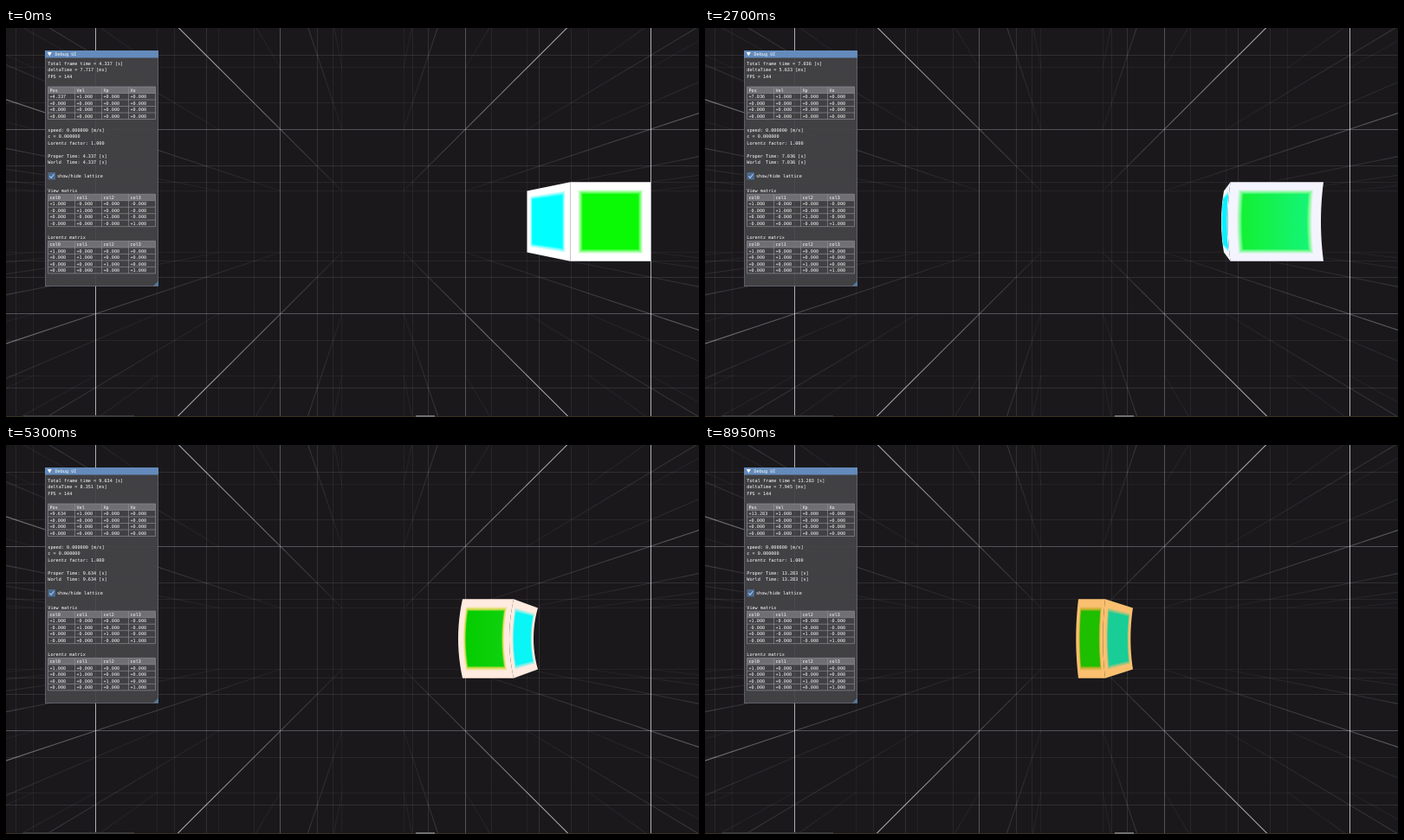
Recreate the animation shown at these times as an HTML page with a canvas. Size 800 by 450 pixels, loop 9000 ms.

```html
<!DOCTYPE html>
<html lang="en">
<head>
<meta charset="utf-8">
<title>Relativistic cube</title>
<style>
  html, body { margin: 0; width: 100%; height: 100%; overflow: hidden; background: #1a181b; }
  canvas, svg { position: absolute; left: 0; top: 0; width: 800px; height: 450px; }
  text {
    font: 5.17px "DejaVu Sans Mono", monospace;
    fill: #fff; white-space: pre; text-rendering: geometricPrecision;
  }
</style>
</head>
<body>
<canvas id="lattice" width="800" height="450"></canvas>
<canvas id="cube" width="800" height="450"></canvas>
<svg id="ui" viewBox="0 0 800 450"></svg>
<script>
const LOOP = 9000, STEP = 50;
const CX = 423.5, CY = 224, FOCAL = 320.5;
const NEAR = 3.5, FAR = 4.5;
const lerp = (a, b, k) => a + (b - a) * k;

// Smooth curve through [time, value] pairs.
function track(points) {
  const slope = (a, b) => (points[b][1] - points[a][1]) / (points[b][0] - points[a][0]);
  const last = points.length - 1;
  const tangent = i => slope(Math.max(i - 1, 0), Math.min(i + 1, last));
  return t => {
    if (t >= points[last][0]) return points[last][1];
    let i = 0;
    while (points[i + 1][0] <= t) i++;
    const [t0, a] = points[i], [t1, b] = points[i + 1];
    const h = t1 - t0, k = (t - t0) / h, k2 = k * k, k3 = k2 * k;
    return a * (2 * k3 - 3 * k2 + 1) + b * (3 * k2 - 2 * k3)
      + h * (tangent(i) * (k3 - 2 * k2 + k) + tangent(i + 1) * (k3 - k2));
  };
}

const COLOR_TIMES = [0, 1300, 2700, 3700, 5300, 7600, 8950];
function colorTrack(list) {
  const colors = list.split(' ').map(hex => [0, 2, 4].map(i => parseInt(hex.substr(i, 2), 16)));
  return t => {
    let i = 0;
    while (i < colors.length - 2 && COLOR_TIMES[i + 1] <= t) i++;
    const k = (t - COLOR_TIMES[i]) / (COLOR_TIMES[i + 1] - COLOR_TIMES[i]);
    return colors[i].map((c, n) => lerp(c, colors[i + 1][n], k));
  };
}
const rgb = c => `rgb(${c.map(Math.round).join()})`;
const mix = (a, b, k) => a.map((c, i) => lerp(c, b[i], k));

// Screen x of the cube's corner edges.
const frontLeft = track([[0, 651.5], [600, 650], [1300, 643], [2700, 606.5], [3700, 574],
  [5300, 527], [7600, 466.5], [8950, 431]]);
const frontRight = track([[0, 744], [950, 743.7], [1300, 742], [1900, 736], [2700, 714],
  [3700, 668], [5300, 586], [7600, 502.5], [8950, 462]]);
const backLeft = track([[0, 601.5], [1300, 602.5], [2700, 599], [3700, 578], [8950, 450]]);
const backRight = track([[0, 672], [2700, 672], [3700, 666], [4750, 634], [5700, 599],
  [6650, 565], [7600, 534], [8950, 494]]);
const bulge = track([[0, 0], [1300, 0.8], [2700, 3], [3700, 4], [5300, 5], [7600, 4.5], [8950, 2.7]]);
const deltaTime = track([[0, 7.717], [1300, 7.915], [2700, 5.633], [3700, 8.017],
  [5300, 8.351], [7600, 8.11], [8950, 7.945]]);

const paint = {
  border: colorTrack('ffffff fcfcff f4f4ff f4f4ff ffebe0 ffd0a8 fac070'),
  halo: colorTrack('84ff80 88fca0 88fa9c 88f890 dcdc50 e8be2c c8b030'),
  left: colorTrack('0afa05 10f546 14f032 00fa00 05cd00 10cd00 1ebe00'),
  right: colorTrack('0afa05 10f546 14f57d 1ee178 10d210 10cd00 1ebe00'),
  side: colorTrack('00ffff 14f0ff 0af0ff 0af0ff 0af5f5 1ec8b0 19cd96'),
};

function drawLattice() {
  const g = document.getElementById('lattice').getContext('2d');
  const stroke = (x0, y0, x1, y1, depth) => {
    g.strokeStyle = `rgba(222,222,225,${Math.min(0.6, 0.47 / depth ** 1.5)})`;
    g.beginPath();
    g.moveTo(x0, y0);
    g.lineTo(x1, y1);
    g.stroke();
  };
  const snap = v => Math.floor(v) + 0.5;
  for (let d = 0.5; d <= FAR; d++) {
    for (let i = -6.5; i <= 6.5; i++) {
      const x = snap(CX + FOCAL * i / d), y = snap(CY + FOCAL * i / d);
      stroke(x, 0, x, 450, d);
      stroke(0, y, 800, y, d);
    }
  }
  // Lines running into the depth, in short pieces that fade.
  g.lineWidth = 1.15;
  const pieces = 24, from = 1 / FAR, to = 2;
  for (let i = -6.5; i <= 6.5; i++) {
    for (let j = -6.5; j <= 6.5; j++) {
      for (let n = 0; n < pieces; n++) {
        const a = lerp(from, to, (n / pieces) ** 1.5);
        const b = lerp(from, to, ((n + 1) / pieces) ** 1.5);
        stroke(CX + FOCAL * i * a, CY + FOCAL * j * a,
               CX + FOCAL * i * b, CY + FOCAL * j * b, 2 / (a + b));
      }
    }
  }
  const strip = (x, y, w, h, color) => { g.fillStyle = color; g.fillRect(x, y, w, h); };
  strip(0, 449, 800, 1, '#393322');
  strip(20, 448, 128, 2, '#3b3b3b');
  strip(473, 448, 22, 2, '#707070');
}

const ctx = document.getElementById('cube').getContext('2d');

function drawFace(x0, d0, x1, d1, bend, border, halo, from, to) {
  const point = (u, v) => {
    const d = lerp(d0, d1, u);
    const x = CX + lerp((x0 - CX) * d0, (x1 - CX) * d1, u) / d;
    return [x - bend * (1 - (2 * v - 1) ** 2), CY + (v - 0.5) * FOCAL / d];
  };
  const fill = (inset, style) => {
    const n = 12;
    ctx.beginPath();
    for (let i = 0; i <= n; i++) ctx.lineTo(...point(inset, lerp(inset, 1 - inset, i / n)));
    for (let i = n; i >= 0; i--) ctx.lineTo(...point(1 - inset, lerp(inset, 1 - inset, i / n)));
    ctx.fillStyle = style;
    ctx.fill();
  };
  fill(0, rgb(border));
  const middle = mix(from, to, 0.5), layers = 6;
  for (let i = 1; i <= layers; i++) {
    const k = 2 * i / (layers + 1);
    const color = k < 1 ? mix(border, halo, k) : mix(halo, middle, k - 1);
    fill(0.09 + 0.055 * i / layers, rgb(color));
  }
  const shade = ctx.createLinearGradient(x0, 0, x1, 0);
  shade.addColorStop(0.1, rgb(from));
  shade.addColorStop(0.9, rgb(to));
  fill(0.15, shade);
}

function drawCube(t) {
  ctx.clearRect(0, 0, 800, 450);
  const l = frontLeft(t), r = frontRight(t), bl = backLeft(t), br = backRight(t), bend = bulge(t);
  const border = paint.border(t), side = paint.side(t), sideHalo = mix(border, side, 0.5);
  if (bl < l) drawFace(bl, FAR, l, NEAR, bend, border, sideHalo, side, side);
  if (br > r) drawFace(r, NEAR, br, FAR, bend, border, sideHalo, side, side);
  drawFace(l, NEAR, r, NEAR, bend, border, paint.halo(t), paint.left(t), paint.right(t));
}

const label = (x, y, str, id = '') => `<text x="${x}" y="${y + 1.9}" id="${id}">${str}</text>`;
const box = (x, y, w, h, attrs) => `<rect x="${x}" y="${y}" width="${w}" height="${h}" ${attrs}/>`;

function table(y, heads, rows) {
  const pitch = 7.5, w = 124;
  let out = box(48.5, y, w, pitch, 'fill="#707074"');
  let grid = '';
  for (let i = 0; i <= 5; i++) grid += `M48.5 ${y + i * pitch}h${w}`;
  for (let i = 0; i <= 4; i++) grid += `M${48.5 + i * 31} ${y}v${5 * pitch}`;
  out += `<path d="${grid}" stroke="#8b8b92" stroke-width=".7" fill="none"/>`;
  [heads, ...rows].forEach((row, r) => row.split(' ').forEach((cell, c) => {
    out += label(50.5 + c * 31, y + 3.8 + r * pitch, cell, cell === '+pos' ? 'pos' : '');
  }));
  return out;
}

function buildPanel() {
  const zeros = '+0.000 +0.000 +0.000 +0.000', cols = 'col0 col1 col2 col3';
  document.getElementById('ui').innerHTML =
    box(45.5, 26.5, 130, 272, 'fill="#444346" fill-opacity=".93" stroke="#6c6c78" stroke-width=".8"') +
    box(45, 26, 131, 8.5, 'fill="#648bbb"') +
    '<path d="M47.8 28h5l-2.5 4.4z" fill="#fff"/>' +
    '<path d="M176 292.5v6h-6z" fill="#55789f"/>' +
    label(56.5, 30.2, 'Debug UI') +
    label(48.3, 41, '', 'total') + label(48.3, 48.4, '', 'delta') + label(48.3, 56, 'FPS = 144') +
    table(68, 'Pos Vel Xp Xo', ['+pos +1.000 +0.000 +0.000', zeros, zeros, zeros]) +
    label(48.3, 117.6, 'speed: 0.000000 [m/s]') +
    label(48.3, 125.2, 'c = 0.000000') +
    label(48.3, 132.6, 'Lorentz factor: 1.000') +
    label(48.3, 147.8, '', 'proper') + label(48.3, 155.2, '', 'world') +
    box(48.5, 167, 8.5, 8.5, 'fill="#4d6a8c"') +
    '<path d="M50.3 171.3l1.8 2 3.4-4.3" fill="none" stroke="#9fcbff" stroke-width="1.1"/>' +
    label(59, 171.3, 'show/hide lattice') +
    label(48.3, 187.8, 'View matrix') +
    table(192.2, cols, ['+1.000 -0.000 +0.000 -0.000', '-0.000 +1.000 +0.000 -0.000',
      '+0.000 -0.000 +1.000 -0.000', '-0.000 +0.000 -0.000 +1.000']) +
    label(48.3, 242, 'Lorentz matrix') +
    table(246.4, cols, [0, 1, 2, 3].map(r =>
      [0, 1, 2, 3].map(c => c === r ? '+1.000' : '+0.000').join(' ')));
}

function setText(id, str) { document.getElementById(id).textContent = str; }

function updatePanel(t) {
  const clock = (4.337 + t * 0.0009995).toFixed(3);
  setText('total', `Total frame time = ${clock} [s]`);
  setText('delta', `deltaTime = ${deltaTime(t).toFixed(3)} [ms]`);
  setText('pos', `+${clock}`);
  setText('proper', `Proper Time: ${clock} [s]`);
  setText('world', `World  Time: ${clock} [s]`);
}

drawLattice();
buildPanel();

const start = performance.now();
function tick() {
  const t = Math.floor((performance.now() - start) % LOOP / STEP) * STEP;
  drawCube(t);
  updatePanel(t);
  requestAnimationFrame(tick);
}
tick();
</script>
</body>
</html>
```
